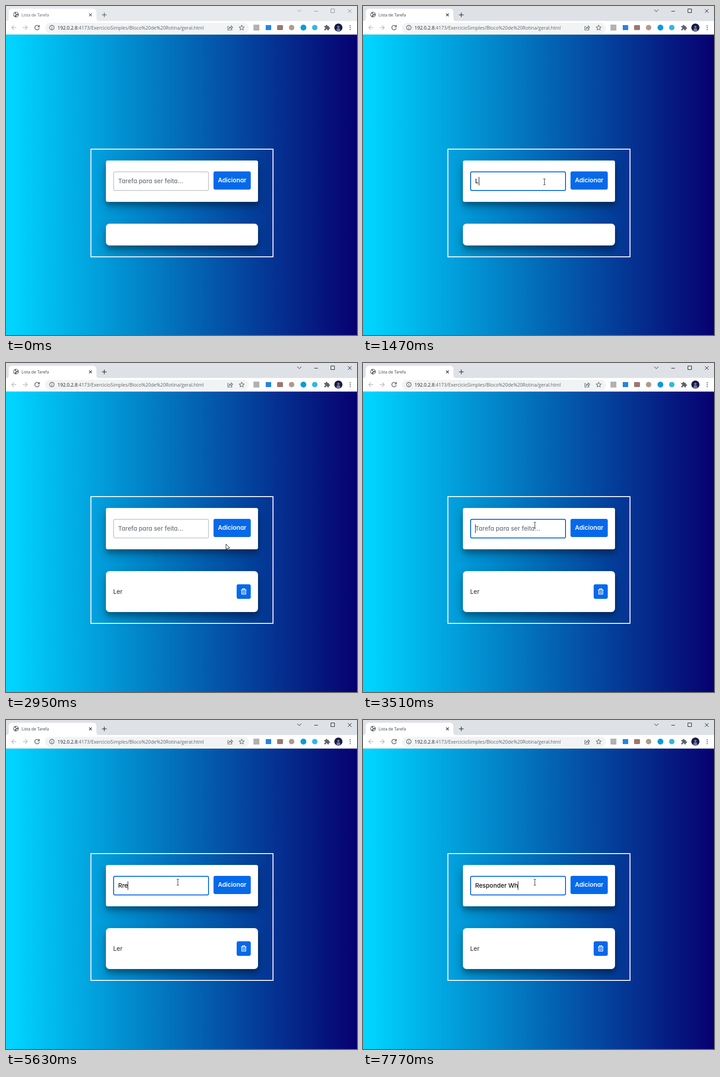
These frames come from a looping animation (773x724 px, 8 s). An HTML page:

```html
<!DOCTYPE html>
<html lang="pt-BR">
<head>
<meta charset="utf-8">
<title>Lista de Tarefa</title>
<style>
  html, body { margin: 0; width: 100%; height: 100%; overflow: hidden; }
  * { box-sizing: border-box; }
  #stage {
    position: relative; width: 773px; height: 724px; overflow: hidden;
    background: linear-gradient(90deg, #00d4ff 1.5%, #060070 100%) 0 63px / 773px 661px no-repeat;
    font: 500 13.4px Inter, "Open Sans", sans-serif;
    font-feature-settings: "cv11";
    --strip: #e7eaed; --ink: #5f6368; --win: #858789;
  }
  #stage.active { --strip: #dee1e6; --ink: #3c4043; --win: #111; }
  #stage svg { position: absolute; display: block; }
  #chrome { left: 0; top: 0; font-family: "Open Sans", "Noto Sans", sans-serif; font-weight: 400; }
  #chrome .line { fill: none; stroke: #5f6368; stroke-width: 1.3; }
  #chrome .win { fill: none; stroke: var(--win); stroke-width: 1; }
  #chrome .tab { fill: none; stroke: var(--ink); stroke-width: 1.5; }
  #frame, .card, .input, .button, #item, #typed, #caret, #hint { position: absolute; }
  #frame { left: 186px; width: 403px; border: 2px solid #fff; }
  .card {
    left: 32px; width: 335px; background: #fff;
    box-shadow: 0 11px 22px rgba(0, 0, 0, .25), 0 8px 9px rgba(0, 0, 0, .2);
  }
  #form { top: 24px; height: 91px; border-radius: 4px; }
  #list { top: 163px; border-radius: 8px; }
  .input {
    left: 16px; top: 24px; width: 211px; height: 43px;
    border: 2px solid #ced0d3; border-radius: 4px; line-height: 39px; white-space: pre;
  }
  .input.focus { border-color: #0667e4; }
  #hint, #typed { left: 9px; top: 0; height: 39px; }
  #hint { color: #6c757d; }
  #typed { color: #111; }
  #caret { left: 100%; top: 10px; width: 1px; height: 19px; background: #000; }
  .button { background: #0669e9; border-radius: 4px; color: #fff; }
  #add { left: 237px; top: 24px; width: 82px; height: 40px; font-weight: 600; text-align: center; line-height: 39px; }
  #item { inset: 0; font-weight: 400; color: #212529; }
  #item span { position: absolute; left: 16px; top: 35px; line-height: 20px; }
  #trash { left: 288px; top: 29px; width: 31px; height: 32px; }
  #pointer { left: 0; top: 0; }
</style>
</head>
<body>
<div id="stage">
  <svg id="chrome" width="773" height="63">
    <rect width="773" height="34" style="fill:var(--strip)"/>
    <path d="M0 33q6 0 6-6V14q0-8 8-8H191q8 0 8 8V27q0 6 6 6H773V63H0z" fill="#fff"/>
    <path d="M0 62.5H773" stroke="#dfe1e4"/>
    <circle cx="22" cy="19" r="6" fill="#5f6368"/>
    <path d="M18 16l3 1 1 2-2 1v3l-2-2-1-3zM22 14l3 1 1 2-2 1-2-1zM23 20l3 0-1 3-2 1z" fill="#fff"/>
    <text x="34" y="22.5" font-size="9" style="fill:var(--ink)">Lista de Tarefa</text>
    <path class="tab" d="M183 16.500l6 6m0-6l-6 6M211.500 19.500h10m-5-5v10"/>
    <path class="win" d="M641.500 8l4.500 4.500 4.500-4.500M679 11.500h8M715.500 6.500h8v8h-8zM753 7l8 8m0-8l-8 8"/>

    <g fill="none" stroke="#b9bbbe" stroke-width="1.4">
      <path d="M22.500 47.500h-10m5-5l-5 5 5 5M37 47.500h10m-5-5l5 5-5 5"/>
    </g>
    <path class="line" style="stroke-width:1.6" d="M72.500 44.500a5 5 0 1 0 .8 4.300M73.500 42v4h-4"/>
    <rect x="86" y="37" width="449" height="22" rx="11" fill="#f1f3f4"/>
    <circle class="line" cx="101" cy="47.500" r="5"/>
    <path class="line" d="M101 47v3.500M101 44.500v1.300"/>
    <text x="113.500" y="51.500" font-size="10.4" fill="#5f6368"><tspan fill="#202124">192.0.2.8</tspan>:4173/ExercicioSimples/Bloco%20de%20Rotina/geral.html</text>
    <path class="line" style="stroke-width:1.1" d="M491 45h-2.500v8h9v-2.500M491 50q.5-4 5-4v-2.500l3.500 3.500-3.500 3.500V48q-3-.2-5 2z"/>
    <path class="line" style="stroke-width:1.1" d="M519 42.300l1.600 3.500 3.900.4-2.900 2.600.8 3.800-3.400-2-3.400 2 .8-3.800-2.900-2.600 3.900-.4z"/>

    <rect x="545" y="41" width="13" height="13" fill="#b2b2b2"/>
    <rect x="572" y="42" width="12" height="11" fill="#2583e5"/>
    <rect x="597" y="42" width="13" height="11" rx="2" fill="#9b7770"/>
    <circle cx="629" cy="47.500" r="6" fill="#b19a89"/>
    <circle cx="655" cy="47.500" r="6.500" fill="#079bd8"/>
    <circle cx="680" cy="47.500" r="6" fill="#32b8dc"/>
    <path d="M701 44h3.200a1.900 1.900 0 1 1 3.600 0h3.200v3a1.900 1.900 0 1 1 0 3.500v3h-3.300a1.800 1.800 0 1 0-3.400 0H701v-3.200a1.800 1.800 0 1 0 0-3.400z" fill="#5f6368"/>
    <circle cx="732" cy="47.500" r="9" fill="#191a46"/>
    <path d="M728 56v-4q0-3 4-3t4 3v4q-4 1-8 0z" fill="#737895"/>
    <circle cx="732" cy="46" r="2.500" fill="#737895"/>
    <g fill="#5f6368"><circle cx="758" cy="43.500" r="1.200"/><circle cx="758" cy="47.800" r="1.200"/><circle cx="758" cy="52" r="1.200"/></g>
  </svg>

  <div id="frame">
    <div id="form" class="card">
      <div id="input" class="input"><span id="hint">Tarefa para ser feita...</span><span id="typed"><span id="text"></span><i id="caret"></i></span></div>
      <div id="add" class="button">Adicionar</div>
    </div>
    <div id="list" class="card">
      <div id="item">
        <span>Ler</span>
        <div id="trash" class="button">
          <svg width="31" height="32" fill="none" stroke="#fff" stroke-width="1.4">
            <path d="M9.500 12.500h12M13 12v-2.300h5V12M11 12.500v9h9v-9M14 15v4.500m3-4.500v4.500"/>
          </svg>
        </div>
      </div>
    </div>
  </div>

  <svg id="pointer" width="773" height="724">
    <circle id="press" r="10" fill="#d9cf32" fill-opacity=".6"/>
    <g id="cursor">
      <path id="arrow" d="M.5.500v12l2.800-2.600 2 4.500 1.900-.8-2-4.400h3.800z" fill="#fff" stroke="#111"/>
      <path id="beam" d="M-2.500-6.500h2l.5.500.5-.5h2M0-6V6M-2.500 6.500h2l.5-.5.5.5h2" fill="none" stroke="#222"/>
      <path id="hand" d="M-.5 10.500V2.500q0-1.500 1.300-1.500T2.100 2.500V7q1.200-1 2.300.2 1.300-.7 2.200.5 1.800-.4 1.900 1.300v4q0 2-1.300 3.500V18.500H.8V17L-3.500 12q-1-1.600.3-2 .8-.2 2.700 2z" fill="#fff" stroke="#111"/>
    </g>
  </svg>
</div>
<script>
const LOOP = 8000, TICK = 200 / 3, BLINK = 530;
const WAKE = 740, BLUR = 2810, ADDED = 2950, REFOCUS = 3440;
const $ = id => document.getElementById(id);

// time, text in the field
const TYPING = [
  [0, ""], [1470, "L"], [1600, "Le"], [1730, "Ler"], [1870, "Ler "], [ADDED, ""],
  [5160, "R"], [5430, "Rr"], [5630, "Rre"], [5900, "R"], [6030, "Re"],
  [6180, "Res"], [6250, "Resp"], [6350, "Respo"], [6430, "Respod"],
  [6780, "Respo"], [6910, "Respon"], [7040, "Respond"], [7110, "Responde"],
  [7240, "Responder"], [7310, "Responder "], [7640, "Responder W"], [7770, "Responder Wh"]
];
// time, x, y
const PATH = [
  [60, 440, 655], [670, 400, 387], [2533, 400, 387],
  [2800, 484, 398], [2950, 484, 398], [3370, 379, 357]
];
const PRESSES = [[730, 810], [BLUR, ADDED], [3370, 3510]];

const lastBefore = (rows, t) => rows.findLast(row => row[0] <= t);
const show = (id, on) => { $(id).style.visibility = on ? "visible" : "hidden"; };

function pointerAt(time) {
  const t = Math.floor((time + 5) / TICK) * TICK;
  const next = PATH.findIndex(p => p[0] > t);
  if (next < 0) return PATH.at(-1).slice(1);
  if (next === 0) return null;
  const [t0, x0, y0] = PATH[next - 1], [t1, x1, y1] = PATH[next];
  const k = (t - t0) / (t1 - t0), e = k * (2 - k);
  return [x0 + (x1 - x0) * e, y0 + (y1 - y0) * e].map(Math.round);
}

function shapeAt(x, y, top) {
  const over = (left, width, height) =>
    x >= left && x < left + width && y >= top + 50 && y < top + 50 + height;
  return over(236, 211, 43) ? "beam" : over(457, 82, 40) ? "hand" : "arrow";
}

function draw(t) {
  const added = t >= ADDED, top = added ? 293 : 314;
  const focused = (t >= WAKE && t < BLUR) || t >= REFOCUS;
  const [typedAt, text] = lastBefore(TYPING, t);
  const blinkFrom = Math.max(typedAt, t >= REFOCUS ? REFOCUS : WAKE);

  $("stage").classList.toggle("active", t >= WAKE);
  $("frame").style.top = top + "px";
  $("frame").style.height = (added ? 281 : 239) + "px";
  $("list").style.height = (added ? 90 : 48) + "px";
  show("item", added);

  $("input").classList.toggle("focus", focused);
  $("text").textContent = text;
  show("hint", !text);
  show("caret", focused && Math.floor((t - blinkFrom) / BLINK) % 2 === 0);

  const pos = pointerAt(t);
  const shape = pos && shapeAt(...pos, top);
  for (const id of ["arrow", "beam", "hand"]) show(id, id === shape);
  show("press", PRESSES.some(([from, to]) => t >= from && t < to));
  if (pos) {
    const [x, y] = pos;
    $("press").setAttribute("transform", `translate(${x} ${y})`);
    const nudge = shape === "beam" ? .5 : 0;
    $("cursor").setAttribute("transform", `translate(${x - nudge} ${y})`);
  }
}

const start = performance.now();
function tick() {
  draw((performance.now() - start) % LOOP);
  requestAnimationFrame(tick);
}
tick();
</script>
</body>
</html>
```
